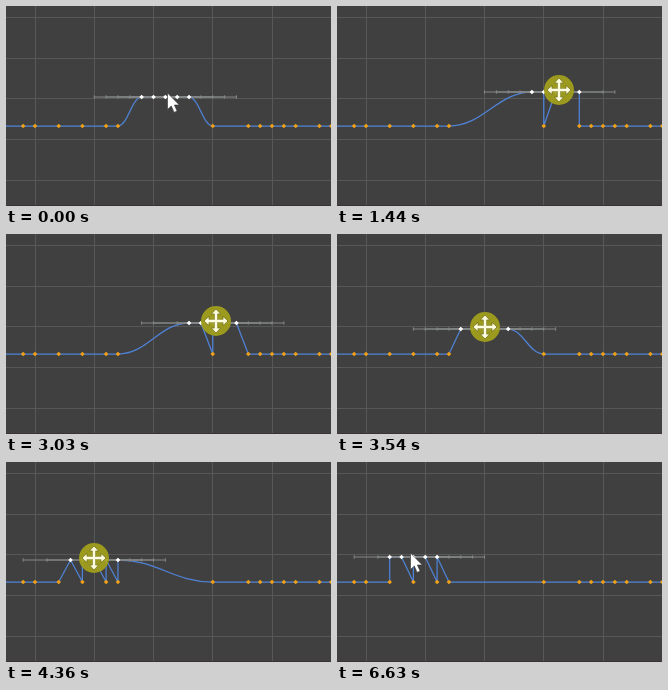
Animation, 325 px wide and 200 px high, one loop 7.9 s. Source, as an HTML page:

```html
<!DOCTYPE html>
<html lang="en">
<head>
<meta charset="utf-8">
<title>Moving keys in a curve editor</title>
<style>
  html, body { margin: 0; width: 100%; height: 100%; overflow: hidden; background: #404040; }
  svg { display: block; width: 325px; height: 200px; }
</style>
</head>
<body>
<svg viewBox="0 0 325 200">
  <rect width="325" height="200" fill="#404040"/>
  <path id="grid" stroke="#575757" fill="none"/>
  <rect y="199" width="325" height="1" fill="#3a3236"/>
  <path id="curve" stroke="#4f82d6" stroke-width="1.25" fill="none" stroke-linejoin="round"/>
  <path id="handles" stroke="#858888" fill="none"/>
  <path id="fixedKeys" fill="#f0a018"/>
  <path id="movedKeys" fill="#fff"/>
  <g id="mover">
    <circle r="15" fill="#a09e1c" fill-opacity=".94"/>
    <path id="cross" fill="#fffde0" stroke="#6c6a18" stroke-width=".7"/>
    <path d="M-7 0H7M0 -7V7" stroke="#fffde0" stroke-width="2.4"/>
  </g>
  <path id="arrow" d="M0 0V16.5L3.8 13L6.6 19.4L9.6 18.1L6.9 12H11.8Z" fill="#fff" stroke="#333" stroke-width=".6"/>
</svg>
<script>
const LOOP = 7900, UNIT = 11.85, ORIGIN = 29, BASE_Y = 120, REACH = 4;
const START_X = 162, FURTHEST = 9;
const FIXED = [-1, 0, 2, 4, 6, 7, 15, 18, 19, 20, 21, 22, 24, 25];
const MOVED = [9, 10, 11, 12, 13];

// [time, x] and [time, y] of the pointer
const PATH_X = [[850, 162], [1440, 222], [1660, 245], [2170, 269], [2680, 269],
  [3030, 210], [3540, 148], [4360, 88], [4410, 83], [4620, 74]];
const PATH_Y = [[850, 89], [1440, 84], [2680, 84], [3030, 87], [3540, 93],
  [4360, 96], [4490, 95], [4620, 95], [4840, 94], [5620, 93]];

// [first, last, intervals] of each run of screen updates
const RUNS = [[0, 0, 0], [920, 1440, 7], [1510, 1660, 2], [1730, 2170, 6],
  [2750, 3030, 4], [3100, 3540, 6], [3620, 4360, 10], [4410, 4410, 0],
  [4490, 4620, 2], [4840, 4840, 0], [5620, 5620, 0]];
const UPDATES = RUNS.flatMap(([a, b, n]) =>
  Array.from({ length: n + 1 }, (_, i) => n ? a + (b - a) * i / n : a));

const $ = id => document.getElementById(id);
const set = (id, d) => $(id).setAttribute("d", d);
const keyX = k => ORIGIN + k * UNIT;
const diamond = (x, y) => `M${x - 2.3} ${y}l2.3 -2.3l2.3 2.3l-2.3 2.3z`;

// Monotone cubic through the points, held at both ends
function follow(points, t) {
  const last = points.length - 1;
  if (t <= points[0][0]) return points[0][1];
  if (t >= points[last][0]) return points[last][1];
  const rate = i => (points[i + 1][1] - points[i][1]) / (points[i + 1][0] - points[i][0]);
  const slope = i => {
    if (i === 0 || i === last) return 0;
    const a = rate(i - 1), b = rate(i);
    return a * b > 0 ? 2 * a * b / (a + b) : 0;
  };
  const i = points.findIndex(p => p[0] > t) - 1;
  const [t0, v0] = points[i], [t1, v1] = points[i + 1];
  const h = t1 - t0, s = (t - t0) / h, r = 1 - s;
  return v0 * (1 + 2 * s) * r * r + slope(i) * h * s * r * r
    + v1 * s * s * (3 - 2 * s) - slope(i + 1) * h * s * s * r;
}

function curvePath(keys) {
  let d = `M0 ${BASE_Y}`, prev = { k: -3, y: BASE_Y };
  for (const key of keys) {
    const x = keyX(key.k), gap = key.k - prev.k;
    if (gap <= 1 || key.y === prev.y) d += `L${x} ${key.y}`;
    else {
      const reach = Math.min(REACH, gap * 0.42) * UNIT;
      d += `C${keyX(prev.k) + reach} ${prev.y} ${x - reach} ${key.y} ${x} ${key.y}`;
    }
    prev = key;
  }
  return d;
}

// A handle collapses on the side where a fixed key shares the position
function handlePath(moved, leftward) {
  let d = "";
  for (const { k, y } of moved) {
    const shared = FIXED.includes(k);
    for (const side of [-1, 1]) {
      if (shared && (side < 0) === leftward) continue;
      const end = keyX(k + side * REACH);
      d += `M${keyX(k)} ${y}H${end}M${end} ${y - 1.7}v3.4`;
    }
  }
  return d;
}

function draw(time) {
  const t = time % LOOP;
  const shown = UPDATES.findLast(u => u <= t);
  const x = follow(PATH_X, shown), y = follow(PATH_Y, shown);
  const shift = Math.round((x - START_X) / UNIT);
  const leftward = shown >= 2750 && shift < FURTHEST;

  const fixed = FIXED.map(k => ({ k, y: BASE_Y, rank: leftward ? 0 : 1 }));
  const moved = MOVED.map(k => ({ k: k + shift, y: y + 2, rank: leftward ? 1 : 0 }));
  const keys = [...fixed, ...moved].sort((a, b) => a.k - b.k || a.rank - b.rank);

  set("curve", curvePath(keys));
  set("handles", handlePath(moved, leftward));
  set("movedKeys", moved.map(p => diamond(keyX(p.k), p.y)).join(""));

  const dragging = t >= 150 && t < 6630;
  $("mover").style.display = dragging ? "" : "none";
  $("arrow").style.display = dragging ? "none" : "";
  $("mover").setAttribute("transform", `translate(${x} ${y})`);
  $("arrow").setAttribute("transform", `translate(${x - 0.5} ${y - 2})`);
}

let grid = "";
for (let i = 0; i < 5; i++) {
  grid += `M${Math.floor(keyX(i * 5)) + 0.5} 0V200M0 ${Math.floor(11.4 + i * 40.75) + 0.5}H325`;
}
set("grid", grid);
set("fixedKeys", FIXED.map(k => diamond(keyX(k), BASE_Y)).join(""));
set("cross", [[0, -1], [1, 0], [0, 1], [-1, 0]].map(([a, b]) => {
  const at = (u, v) => `${a * u - b * v} ${b * u + a * v}`;
  return `M${at(12, 0)}L${at(7, 4.6)}L${at(7, 1.4)}L${at(0, 1.4)}L${at(0, -1.4)}L${at(7, -1.4)}L${at(7, -4.6)}Z`;
}).join(""));

const begin = performance.now();
function tick() {
  draw(performance.now() - begin);
  requestAnimationFrame(tick);
}
tick();
</script>
</body>
</html>
```
